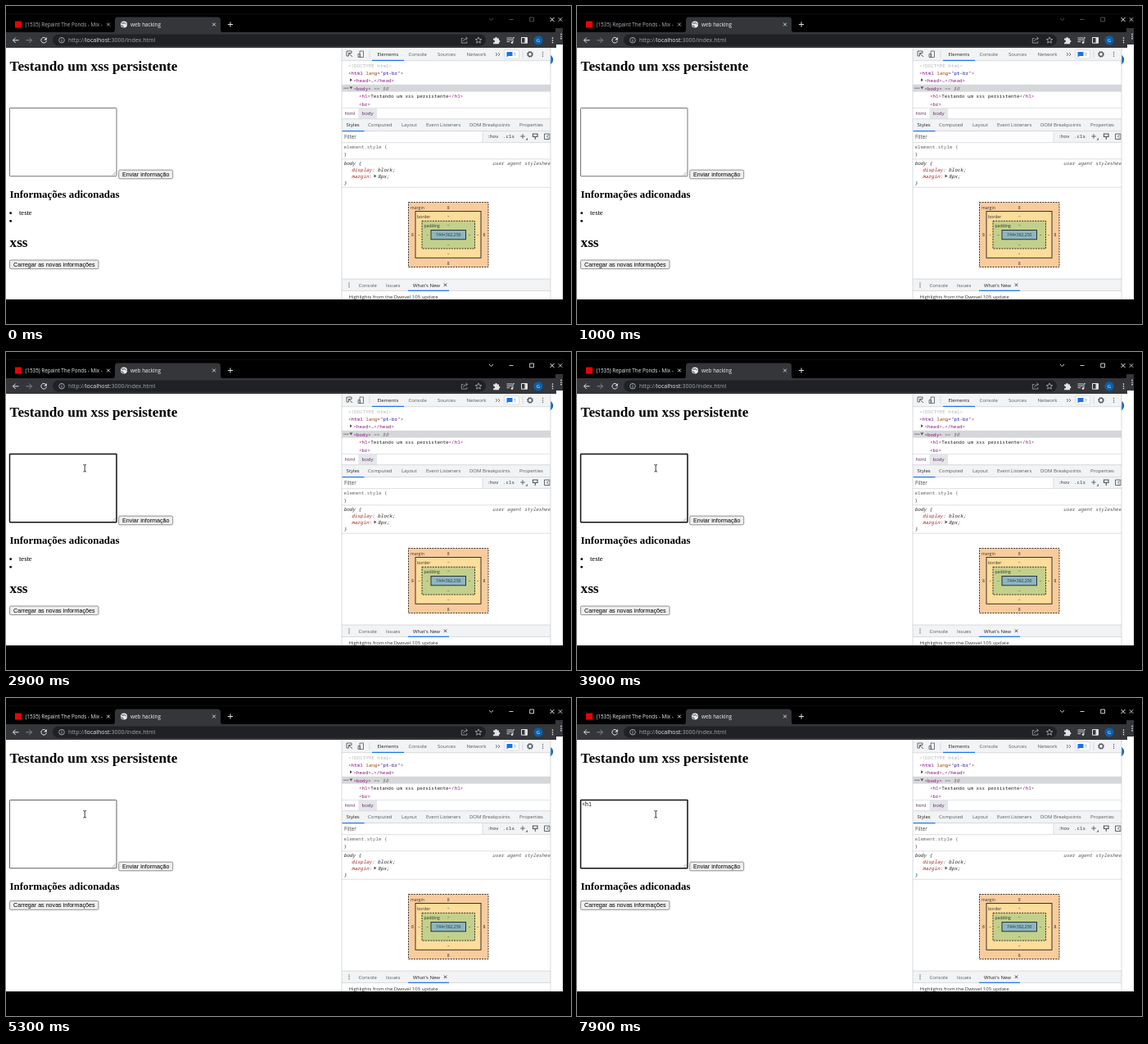
Animation of 690x388 px, one loop 8000 ms. Source, as an HTML page:

```html
<!DOCTYPE html>
<html lang="pt-br">
<head>
<meta charset="utf-8">
<title>web hacking</title>
<style>
  html, body { margin: 0; width: 100%; height: 100%; overflow: hidden; background: #000; }
  svg { display: block; width: 100%; height: 100%; }
  text { white-space: pre; }
  .ui { font-family: "Open Sans", sans-serif; font-size: 6px; }
  .mono { font-family: "Noto Sans Mono", monospace; font-size: 5.9px; }
  .serif { font-family: "Liberation Serif", serif; font-size: 8.56px; }
  .h1 { font-size: 17.25px; font-weight: bold; }
  .h2 { font-size: 12.95px; font-weight: bold; }
  .btn { font-family: "Liberation Sans", sans-serif; font-size: 7.13px; text-anchor: middle; }
  .tiny { font-size: 5.1px; }
  .mid { text-anchor: middle; }
  .it { font-style: italic; }
</style>
</head>
<body>
<svg id="stage" viewBox="0 0 690 388" preserveAspectRatio="none"></svg>
<script>
const rect = (x, y, w, h, fill, more = '') =>
  `<rect x="${x}" y="${y}" width="${w}" height="${h}" fill="${fill}" ${more}/>`;
const text = (x, y, s, cls, fill = '#000', more = '') =>
  `<text x="${x}" y="${y}" class="${cls}" fill="${fill}" ${more}>${s}</text>`;
const line = (d, color, w = 1, more = '') =>
  `<path d="${d}" fill="none" stroke="${color}" stroke-width="${w}" ${more}/>`;
const disc = (x, y, r, fill, more = '') =>
  `<circle cx="${x}" cy="${y}" r="${r}" fill="${fill}" ${more}/>`;
const cross = (x, y, r, color, w = 1) =>
  line(`M${x - r} ${y - r}l${2 * r} ${2 * r}m0 ${-2 * r}l${-2 * r} ${2 * r}`, color, w);
const plus = (x, y, r, color, w = 1) => line(`M${x - r} ${y}h${2 * r}M${x} ${y - r}v${2 * r}`, color, w);
const dots = (x, y, color, gap = 2.7, r = 0.85) =>
  [-1, 0, 1].map(i => disc(x, y + i * gap, r, color)).join('');
const group = (id, body) => `<g id="${id}">${body}</g>`;
const span = (s, fill) => `<tspan fill="${fill}">${s}</tspan>`;
const tag = s => span(`&lt;${s}&gt;`, '#881280');
const button = (y, x, w, s) =>
  rect(x, y, w, 10.7, '#efefef', 'rx="1.5" stroke="#767676" stroke-width=".8"') +
  text(x + w / 2, y + 7.9, s, 'btn');

function star(x, y, r) {
  let d = '';
  for (let i = 0; i < 10; i++) {
    const a = i * Math.PI / 5 - Math.PI / 2, q = i % 2 ? r * 0.45 : r;
    d += (i ? 'L' : 'M') + (x + q * Math.cos(a)).toFixed(2) + ' ' + (y + q * Math.sin(a)).toFixed(2);
  }
  return line(d + 'Z', '#c8cacd', 0.7);
}

function browser() {
  const pale = '#e1e3e6', soft = '#a6a9ad';
  return rect(0, 32, 672, 19, '#35363a') + rect(671, 27, 9, 20, '#35363a') +
    line('M0 9.5H680', '#141415', 0.6) +
    `<path d="M129 32.5q4 0 4-4V17q0-3.5 3.5-3.5H258q4 0 4 3.5v11.5q0 4 4 4z" fill="#35363a"/>` +
    rect(11, 18.5, 8, 8, '#f00000') +
    group('otherTab', text(23.5, 25, '(1535) Repaint The Ponds - Mix - :', 'ui', 'currentColor',
      'style="font-size:6.3px" clip-path="url(#tabClip)"') + cross(125, 22.5, 1.9, 'currentColor', 0.9)) +
    disc(144, 22.5, 4, '#e8eaed') +
    line('M141 20.5q2 1.5 4 0l2 2m-6.5 1l2.5 1v2', '#35363a', 0.9) +
    text(152, 25, 'web hacking', 'ui', '#f1f3f4', 'style="font-size:6.4px"') +
    cross(254, 22.5, 1.9, '#e1e3e6', 0.9) + plus(274, 22.5, 3.1, pale) +
    group('controls', line('M590 15l2.5 2.5l2.5-2.5M614.5 16.5h5M639.7 14h4.8v4.8h-4.8z', 'currentColor', 0.9)) +
    cross(667, 16.5, 2.5, '#f1f3f4') + cross(677, 16.5, 2.3, '#d8dadd', 0.9) +
    line('M15.5 41.8h-7m3.2-3.2l-3.2 3.2l3.2 3.2', pale) +
    line('M24.5 41.8h7m-3.2-3.2l3.2 3.2l-3.2 3.2', '#85888c') +
    line('M48.7 39.6a3.3 3.3 0 1 0 .7 3', pale) + '<path d="M49.8 38v3.5h-3.5z" fill="#e1e3e6"/>' +
    rect(57, 34.5, 529, 14.2, '#202124', 'rx="7.1"') +
    disc(68, 41.7, 3.3, 'none', 'stroke="#bdc1c6" stroke-width=".8"') +
    line('M68 41.3v2.2M68 39.6v.9', '#bdc1c6', 0.9) +
    text(76, 44.2, 'http://' + span('localhost', '#e8eaed') + ':3000/index.html', 'ui', '#a2a6ab', 'style="font-size:7.1px"') +
    line('M558.5 39.5h-2.2v5.6h6.5v-2M558.5 43q.5-3.5 4.8-3.5m-1.8-2l2 2l-2 2', soft, 0.8) +
    star(577, 41.9, 4) +
    `<path d="M595 39.5h2a1.5 1.5 0 1 1 3 0h2v2.2a1.4 1.4 0 1 1 0 2.8v1.7h-7v-2a1.4 1.4 0 1 0 0-2.6z" fill="${pale}"/>` +
    line('M611.5 39h6.5m-6.5 2.3h6.5m-6.5 2.3h3.7M619 44.3v-5.6h2', pale, 0.9) +
    disc(618, 44.6, 1.3, pale) +
    line('M629.5 38.5h7v6.7h-7z', pale, 1) + rect(633.5, 38.5, 3, 6.7, pale) +
    disc(650, 41.8, 5.6, '#0b5fa8') + text(650, 44.1, 'G', 'ui mid', '#fff') +
    dots(667.5, 41.8, pale) + dots(678, 37, pale);
}

function page() {
  return rect(0, 51, 680, 307, '#fff') + rect(672, 47, 8, 4, '#fff') +
    text(4.5, 79, 'Testando um xss persistente', 'serif h1') +
    rect(4.5, 124.5, 130.5, 83.2, '#fff', 'id="field" rx=".6"') +
    line('M129.8 206.5l4-4m-1.8 4l1.8-1.8', '#777', 0.6) +
    text(6.1, 132, '', 'mono', '#000', 'id="typed" style="font-size:6.54px"') +
    rect(6, 125.7, 0.8, 8, '#000', 'id="caret"') +
    button(200.1, 137.7, 66, 'Enviar informação') +
    text(4.5, 233.5, 'Informações adiconadas', 'serif h2') +
    group('list', disc(5.7, 252.7, 1.4, '#000') + text(16, 255, 'teste', 'serif') +
      disc(5.7, 262.3, 1.4, '#000') + text(4.5, 294, 'xss', 'serif h1')) +
    group('load', button(0, 4.5, 108.5, 'Carregar as novas informações')) +
    group('beam', line('M94.4 137.5q1.8 0 1.8 1v6.6q0 1-1.8 1m3.6-8.6q-1.8 0-1.8 1m0 6.6q0 1 1.8 1', '#222', 0.9));
}

function tree() {
  const q = s => span(s, '#1a1aa6');
  const attr = span('&lt;html ', '#881280') + span('lang', '#994500') + span('="', '#881280') +
    q('pt-br') + span('"&gt;', '#881280');
  return text(418, 74.5, '&lt;!DOCTYPE html&gt;', 'mono', '#b4b4b4') +
    text(418, 84, attr, 'mono') +
    '<path d="M420 88.3l3 2l-3 2z" fill="#555"/>' +
    text(424.5, 93, tag('head') + span('…', '#555') + tag('/head'), 'mono') +
    rect(410, 95.8, 255, 8.8, '#d5d7da') +
    [413, 415.2, 417.4].map(x => disc(x, 100.2, 0.7, '#555')).join('') +
    '<path d="M419.3 98.5h4l-2 3z" fill="#555"/>' +
    text(424.5, 102.5, tag('body') + span(' == <tspan class="it">$0</tspan>', '#777'), 'mono') +
    text(431, 112, tag('h1') + 'Testando um xss persistente' + tag('/h1'), 'mono', '#222') +
    text(431, 121.5, tag('br'), 'mono');
}

function boxModel() {
  const box = (x, y, w, h, fill, dash) =>
    rect(x, y, w, h, fill, `stroke="#222" stroke-width=".9" ${dash ? 'stroke-dasharray="2 1.2"' : ''}`);
  const mark = (x, y, s) => text(x, y, s, 'ui tiny mid', '#333');
  let s = box(491.5, 239.5, 97.5, 79, '#f9cc9d', true) + box(500, 250.5, 80, 56.8, '#fddd9b') +
    box(508, 262.3, 64.5, 33.7, '#c3d08b', true) + box(519, 273.5, 42.5, 11.3, '#8cb6c0') +
    text(494, 247.5, 'margin', 'ui tiny', '#333') + text(502, 258.8, 'border', 'ui tiny', '#333') +
    text(510.5, 270, 'padding', 'ui tiny', '#333') + mark(540.3, 281, '744×362,250');
  [[247.5, 316, 496.5, 584, '8'], [257.5, 304, 504.5, 576, '–'], [269, 292.5, 514.5, 566, '–']]
    .forEach(([top, bottom, left, right, v]) => {
      s += mark(540.3, top, v) + mark(540.3, bottom, v) + mark(left, 281, v) + mark(right, 281, v);
    });
  return s;
}

function styles() {
  const prop = s => span(s, '#a3231f');
  return text(412.5, 174, 'element.style {', 'mono', '#666') + text(412.5, 183, '}', 'mono', '#333') +
    line('M410 186.8H665', '#d0d2d5', 0.7) +
    text(412.5, 193.7, 'body {', 'mono it', '#222') +
    text(594, 193.7, 'user agent stylesheet', 'mono it', '#555') +
    text(422, 202, prop('display') + ': block;', 'mono it', '#222') +
    text(422, 209.8, prop('margin') + ':', 'mono it', '#222') +
    '<path d="M449.5 205.6l3 2l-3 2z" fill="#555"/>' +
    text(454, 209.8, '8px;', 'mono it', '#222') + text(412.5, 217.8, '}', 'mono it', '#222') +
    line('M410 221.2H665', '#d0d2d5', 0.7) + boxModel();
}

function devtools() {
  const gray = '#55595e', bar = '#f1f3f4', blue = '#1a73e8';
  const row = list => list.map(([x, y, s, c = gray]) => text(x, y, s, 'ui', c)).join('');
  return rect(410, 51, 255, 15.5, bar) + line('M410 66.7H665', '#cacdd1', 0.7) +
    line('M422 57.5v-2.5h-6v6h2.5M418.5 57.5l4.5 4.5m-4.5-1v-3.5h3.5', gray, 0.9) +
    line('M432 55h4.5v7.5h-4.5zM430 58.5h2.5v4h-2.5z', gray, 0.8) +
    line('M444 54.5v9', '#cacdd1', 0.7) +
    row([[453.5, 61.3, 'Elements', '#222'], [491.5, 61.3, 'Console'], [527, 61.3, 'Sources'], [562.5, 61.3, 'Network']]) +
    rect(447, 65.8, 39, 1.2, blue) +
    line('M598 57l2 2l-2 2m3-4l2 2l-2 2', gray, 0.8) +
    rect(608.5, 53.7, 18, 10.3, '#fff', 'rx="1.5" stroke="#cfd2d6" stroke-width=".7"') +
    '<path d="M611.5 56h7v5h-5l-2 1.5z" fill="#1a73e8"/>' + text(620, 61.2, '1', 'ui', blue) +
    line('M631 54.5v9', '#cacdd1', 0.7) +
    disc(640, 58.9, 2.5, 'none', `stroke="${gray}" stroke-width="1.3"`) +
    disc(640, 58.9, 3.5, 'none', `stroke="${gray}" stroke-width="1" stroke-dasharray="1.4 1.349"`) +
    dots(655.5, 58.9, gray, 2.4, 0.7) +
    tree() +
    line('M410 124.5H665', '#d6d8db', 0.7) + rect(430.5, 125, 22.5, 12.5, '#e4e6e9') +
    row([[413.5, 133.2, 'html', '#5b2a60'], [434.5, 133.2, 'body', '#5b2a60']]) +
    rect(410, 137.7, 255, 15, bar) + line('M410 137.7H665M410 152.5H665', '#cacdd1', 0.7) +
    row([[415.5, 147.3, 'Styles', '#222'], [442, 147.3, 'Computed'], [483, 147.3, 'Layout'],
      [513, 147.3, 'Event Listeners'], [566, 147.3, 'DOM Breakpoints'], [627, 147.3, 'Properties']]) +
    rect(410.5, 152, 27, 1.2, blue) +
    rect(582, 153, 83, 13.5, bar) + text(413, 161.7, 'Filter', 'ui', '#444', 'style="font-size:6.3px"') +
    line('M582 153.5v12.5M410 166.6H665', '#d0d2d5', 0.7) +
    text(587.5, 161.3, ':hov', 'mono', '#333') + text(607, 161.3, '.cls', 'mono', '#333') +
    plus(631, 159, 2.8, gray, 0.9) + `<path d="M637 161v2.5h-2.5z" fill="${gray}"/>` +
    line('M643.5 156h5.5v3.5h-5.5zM646.3 159.5v3.2', gray, 1.2) +
    line('M657.5 156h6.5v6.5h-6.5zM662.5 157.5l-2 1.7l2 1.7', gray, 0.9) +
    group('rules', styles()) +
    group('noRules', text(540, 177, 'No matching selector or style', 'ui it mid', '#444', 'style="font-size:6.2px"') +
      line('M410 181.5H665', '#d0d2d5', 0.7)) +
    rect(410, 333, 255, 14.5, bar) + line('M410 333H665M410 347.5H665', '#cacdd1', 0.7) +
    dots(419, 340.3, gray, 2.4, 0.7) +
    row([[430.5, 342.7, 'Console'], [464, 342.7, 'Issues'], [497, 342.7, "What's New", '#222'],
      [418.5, 357, 'Highlights from the Dwovel 105 update', '#333']]) +
    cross(536.5, 340.3, 1.7, '#333', 0.9) + rect(491, 346.7, 50, 1.2, blue);
}

const stage = document.getElementById('stage');
stage.innerHTML =
  `<defs><clipPath id="tabClip">${rect(23, 14, 95, 17, '#fff')}</clipPath>
   <clipPath id="panel">${rect(409.5, 51, 255.5, 307, '#fff')}</clipPath>
   <clipPath id="sliver">${rect(664.7, 52, 8, 30, '#fff')}</clipPath></defs>` +
  rect(0, 0, 690, 388, '#000') + browser() + page() +
  disc(662, 65.5, 6.2, '#1267b4', 'clip-path="url(#sliver)"') +
  `<g clip-path="url(#panel)">${devtools()}</g>` +
  line('M410 51V358M665 51V358', '#cfd1d4', 0.8);

const el = id => document.getElementById(id);
const show = (id, on) => el(id).setAttribute('visibility', on ? 'visible' : 'hidden');
const LOOP = 8000, ACTIVE = 2400, RELOAD = 5200, REFOCUS = 5900;
const KEYS = [7000, 7300, 7400];

function draw(t) {
  const within = (a, b) => t >= a && t < b;
  const active = t >= ACTIVE;
  const focused = within(ACTIVE, RELOAD) || t >= REFOCUS;
  const typed = KEYS.filter(k => t >= k).length;

  el('controls').setAttribute('color', active ? '#e1e3e6' : '#55575a');
  el('otherTab').setAttribute('color', active ? '#eceef0' : '#b4b7ba');
  const field = el('field');
  field.setAttribute('stroke', focused ? '#101010' : t >= 1500 ? '#606060' : '#767676');
  field.setAttribute('stroke-width', focused ? 1.5 : 1);
  el('typed').textContent = '<h1'.slice(0, typed);
  el('caret').setAttribute('x', 6 + typed * 3.92);
  show('caret', within(2400, 2900) || within(3400, 3900) || within(5900, 6400) || within(7000, 7900));
  show('beam', active);

  const reloaded = t >= RELOAD;
  show('list', !reloaded);
  el('load').setAttribute('transform', `translate(0 ${reloaded ? 247.6 : 310})`);
  const blank = within(RELOAD, 5300);
  show('rules', !blank);
  show('noRules', blank);
}

const start = performance.now();
function tick() {
  draw((performance.now() - start) % LOOP);
  requestAnimationFrame(tick);
}
tick();
</script>
</body>
</html>
```
